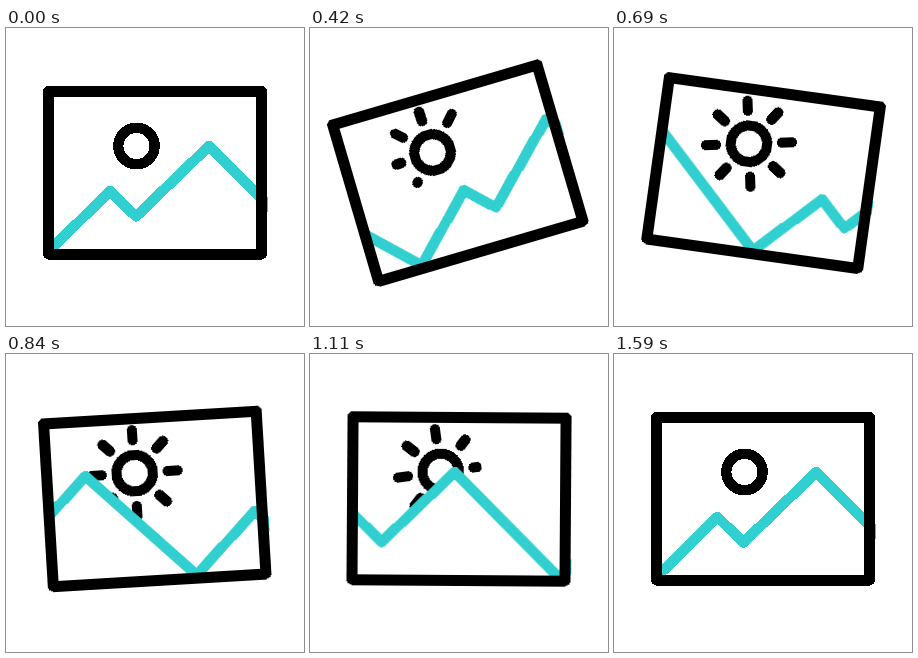
An HTML page that plays this animation: 298x298 px, repeating every 1.8 s.

```html
<!DOCTYPE html>
<html lang="en">
<head>
<meta charset="utf-8">
<title>Picture icon</title>
<style>
  html, body { margin: 0; width: 100%; height: 100%; overflow: hidden; background: #fff; }
  svg { display: block; width: 100%; height: 100%; shape-rendering: crispEdges; }

  .picture, .rays, .hills, .rays line {
    animation: 1800ms cubic-bezier(.3333, 0, .6667, 1) infinite both;
  }
  .ink { fill: none; stroke: #000; stroke-linecap: round; stroke-linejoin: round; }

  .picture { transform-origin: 149px 149px; animation-name: swing; }
  .hills {
    fill: #fff; stroke: #32cfd0; stroke-width: 10.5;
    stroke-linecap: round; stroke-linejoin: round;
    animation-name: scroll;
  }
  .rays { transform-origin: 0 0; animation-name: turn; }
  .rays line {
    transform-origin: 0 0;
    transform: rotate(calc(var(--i) * -45deg));
    stroke-dasharray: 10 20;
    animation-name: ray;
    animation-delay: calc(var(--i) * 46ms);
  }

  @keyframes swing {
    0%       { transform: rotate(0deg); }
    21.111%  { transform: rotate(-17.5deg); }
    38.889%  { transform: rotate(8deg); }
    48.889%  { transform: rotate(-5deg); }
    58.333%  { transform: rotate(.9deg); }
    64.444%, 100% { transform: rotate(0deg); }
  }
  @keyframes scroll {
    0% { transform: translateX(0); }
    88.333%, 100% { transform: translateX(265px); }
  }
  @keyframes turn {
    0% { transform: rotate(0deg); }
    48.333%, 56.111% { transform: rotate(90deg); }
    86.667%, 100% { transform: rotate(0deg); }
  }
  /* Each ray grows outwards, then shrinks back */
  @keyframes ray {
    0%, 11.389%, 65.167%, 100% { stroke-dashoffset: 10; visibility: hidden; }
    20.278%, 56.278% { stroke-dashoffset: 0; visibility: visible; }
  }
</style>
</head>
<body>
<svg viewBox="0 0 298 298">
  <defs>
    <clipPath id="view"><path d="M42 63H261.5V226H42Z"/></clipPath>
  </defs>
  <g class="picture">
    <g class="ink" transform="translate(130.5 118)" stroke-width="10.3">
      <circle r="18.2"/>
      <g class="rays">
        <line y1="-33" y2="-43" style="--i:0"/>
        <line y1="-33" y2="-43" style="--i:1"/>
        <line y1="-33" y2="-43" style="--i:2"/>
        <line y1="-33" y2="-43" style="--i:3"/>
        <line y1="-33" y2="-43" style="--i:4"/>
        <line y1="-33" y2="-43" style="--i:5"/>
        <line y1="-33" y2="-43" style="--i:6"/>
        <line y1="-33" y2="-43" style="--i:7"/>
      </g>
    </g>
    <g clip-path="url(#view)">
      <path class="hills" d="M-222 222.5L-161.6 163L-135.6 188.5L-62.6 118L41.3 222.5H43.5L104 163L130 188.5L203 118L307 222.5"/>
    </g>
    <rect class="ink" x="42.5" y="63.5" width="213" height="162.5" stroke-width="11"/>
  </g>
</svg>
</body>
</html>
```
